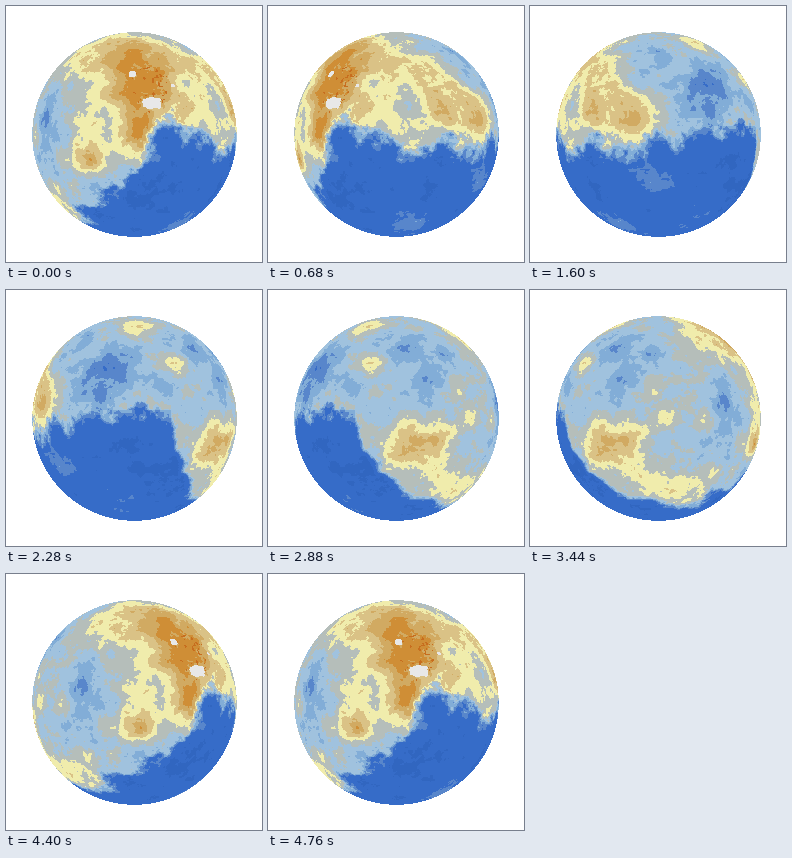
A matplotlib script for the animation above (4800 ms loop, 256 px wide and 256 px high).

```python
import numpy as np
import matplotlib.pyplot as plt
from matplotlib.animation import FuncAnimation

SIZE, FRAMES, INTERVAL = 256, 120, 40
CENTER, RADIUS = 128.5, 102.3
COLS, ROWS = 720, 360

# Colour bands from the sea floor to the summits
BANDS = np.array([
    (49, 102, 192), (54, 108, 200), (88, 134, 203), (130, 173, 215),
    (160, 194, 222), (181, 190, 186), (240, 236, 172), (218, 194, 134),
    (209, 170, 98), (207, 142, 54), (199, 109, 30), (232, 232, 232),
], dtype=np.uint8)
EDGES = np.array([-1.2, 1, 2, 3, 4, 5, 6, 7, 8, 9, 10])

# Hills and basins on a flat plain: (longitude, latitude, radius, rise)
PLAIN = 3.7
RELIEF = [
    (8, 30, 22, 4.3), (345, 62, 16, 2), (4, -2, 8, 3), (332, -14, 8, 3.2),
    (80, 15, 14, 2.8), (62, 45, 12, 1.4), (108, 12, 11, 3),
    (224, -15, 11, 3), (244, -11, 7, 2), (262, 0, 6, 1.5),
    (200, 35, 6, 2.2), (168, 67, 9, 1.8), (297, 43, 8, 1.4),
    (328, 13, 8, 1.2), (298, 9, 10, -1.4), (219, 42, 9, -1.3),
    (145, 18, 16, -1.8), (187, 19, 6, -1.5), (160, 35, 10, -1.1),
]
RELIEF += [(lon, -37, 9, 1.2) for lon in range(240, 320, 20)]

# Edge of the deep sea: (longitude, latitude)
COAST = [
    (2, -27), (9, -11), (20, 2), (34, -2), (70, -14), (109, -9), (140, 2),
    (182, 7), (192, 0), (200, -28), (230, -57), (290, -58), (325, -51),
    (352, -34),
]
SHOALS = [(117, -27, 12, 1.5), (60, -64, 10, 1.2),
          (165, -58, 10, 1.2), (12, -14, 4, 2)]

# Snow caps: (longitude, latitude, half width, half height)
PEAKS = [(10.3, 18, 5.3, 3.1), (-1.5, 36.5, 2.2, 1.8), (25, 28.5, 1.4, 1.1)]


def direction(lon, lat):
    lon, lat = np.radians(lon), np.radians(lat)
    return np.stack([np.cos(lat) * np.cos(lon),
                     np.cos(lat) * np.sin(lon),
                     np.sin(lat)], axis=-1)


def value_noise(points, cells, rng):
    lattice = rng.random((cells + 2,) * 3)
    pos = (points + 1) / 2 * cells
    base = pos.astype(int)
    t = pos - base
    t = t * t * (3 - 2 * t)
    total = 0
    for corner in np.ndindex(2, 2, 2):
        weight = np.prod(np.where(corner, t, 1 - t), axis=-1)
        total = total + weight * lattice[tuple(np.moveaxis(base + corner, -1, 0))]
    return total


def fractal_noise(points, octaves, rng):
    total = sum(0.68 ** n * value_noise(points, cells, rng)
                for n, cells in enumerate(octaves))
    return (total - total.mean()) / total.std()


def bumps(points, places):
    """Sum of round hills, radius in degrees."""
    return sum(rise * np.exp((points @ direction(lon, lat) - 1)
                             / np.radians(radius) ** 2)
               for lon, lat, radius, rise in places)


def build_map():
    rng = np.random.default_rng(11)
    lon, lat = np.meshgrid((np.arange(COLS) + 0.5) * 360 / COLS,
                           90 - (np.arange(ROWS) + 0.5) * 180 / ROWS)
    points = direction(lon, lat)
    noise = fractal_noise(points, (8, 16, 32, 64, 110), rng)
    grain = fractal_noise(points, (64, 110), rng)

    land = np.minimum(PLAIN + bumps(points, RELIEF), 8.4)

    # The shore rises slowly at first, then steeply
    coast = np.interp(lon, *zip(*COAST), period=360)
    inland = lat - coast + 2.5 * noise
    slope = np.maximum(inland, 0)
    shore = 1 + 0.3 * np.clip(inland, -5, None) + 0.02 * slope ** 2
    sea = shore + bumps(points, SHOALS)

    height = np.minimum(np.minimum(land, sea) + 0.55 * noise, 8.9)
    rocky = bumps(points, [(12, 26, 11, 1)]) > 0.4
    height[rocky & (grain > 1.5) & (height > 7)] = 9.5
    for x, y, half_w, half_h in PEAKS:
        dx = (lon - x + 180) % 360 - 180
        cap = (dx / half_w) ** 4 + ((lat - y) / half_h) ** 4
        height[cap < 1 + 0.4 * grain] = 10.5
    return BANDS[np.digitize(height, EDGES)]


def project():
    """Disc mask with the map row and longitude of each pixel in it."""
    axis = np.arange(SIZE) + 0.5
    x, y = np.meshgrid((axis - CENTER) / RADIUS, (CENTER - axis) / RADIUS)
    disc = x * x + y * y <= 1
    x, y = x[disc], y[disc]
    depth = np.sqrt(1 - x * x - y * y)
    lat = np.degrees(np.arcsin(y))
    rows = np.clip(((90 - lat) * ROWS / 180).astype(int), 0, ROWS - 1)
    return disc, rows, np.degrees(np.arctan2(x, depth))


surface = build_map()
disc, rows, lon_offset = project()


def render(frame):
    lon = (lon_offset + frame * 360 / FRAMES) % 360
    cols = (lon * COLS / 360).astype(int) % COLS
    picture = np.full((SIZE, SIZE, 3), 255, dtype=np.uint8)
    picture[disc] = surface[rows, cols]
    return picture


fig = plt.figure(figsize=(SIZE / 100, SIZE / 100), dpi=100, facecolor="white")
ax = fig.add_axes([0, 0, 1, 1])
ax.axis("off")
globe = ax.imshow(render(0), interpolation="nearest", aspect="auto")


def update(frame):
    globe.set_data(render(frame))
    return (globe,)


anim = FuncAnimation(fig, update, frames=FRAMES, interval=INTERVAL,
                     repeat=True, repeat_delay=0, blit=False)
plt.show()
```
